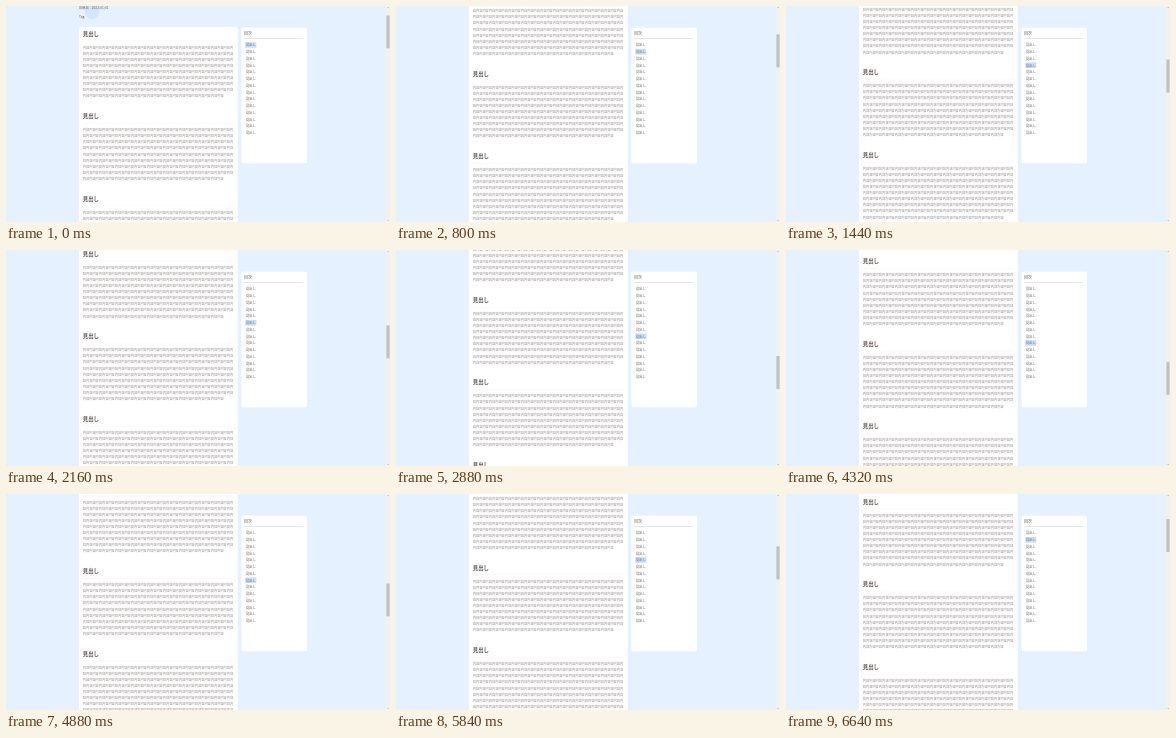
An HTML page that plays this animation: 384 px wide and 216 px high, repeating every 6.72 s.

```html
<!DOCTYPE html>
<html lang="ja">
<meta charset="utf-8">
<style>
html, body { margin: 0; width: 100%; height: 100%; overflow: hidden; background: #e6f1ff; }
/* The page is laid out at 1920 x 1080 and shown at one fifth. */
#stage {
  position: absolute; width: 1920px; height: 1080px; overflow: hidden;
  transform: scale(.2); transform-origin: 0 0;
  font: 16px/30.5px "Noto Sans CJK JP", "Noto Sans CJK", sans-serif; color: #5c5451;
}
#stage div, h2, p { position: absolute; margin: 0; }
#page { width: 1920px; }
#card, #toc { background: #fff; border-radius: 8px; }
#card { left: 365px; top: 105px; width: 794px; height: 6100px; }
#dot { left: 395px; top: -5px; width: 70px; height: 70px; border-radius: 50%; background: #d3e5ff; }
.meta { left: 365px; white-space: nowrap; }
h2 { left: 384px; width: 754px; height: 56px; font-size: 27px; line-height: 40px; border-bottom: 2px solid #f1f1f1; }
p { left: 384px; width: 756px; word-break: break-all; color: #989190; }
#toc { left: 1177px; top: 109px; width: 328px; height: 677px; }
#title { left: 13px; top: 10px; width: 295px; height: 43px; font-size: 20px; font-weight: 500; line-height: 40px; border-bottom: 3px solid #d8d8d8; }
.item { left: 19px; padding: 0 4px; line-height: 28px; font-weight: 500; white-space: nowrap; }
.item.on { background: #cfdff3; color: #56657c; }
#bar { left: 1901px; width: 19px; height: 1080px; background: #f1f1f1; }
#thumb { left: 1px; width: 16px; height: 165px; background: #c1c1c1; }
.arrow { left: 5px; border: 5px solid transparent; }
</style>
<div id="stage">
  <div id="page">
    <div id="card"></div>
    <div id="dot"></div>
    <div class="meta" style="top:-5px">投稿日：2022/01/01</div>
    <div class="meta" style="top:38px">Tag:</div>
  </div>
  <div id="toc"><div id="title">目次</div></div>
  <div id="bar">
    <div id="thumb"></div>
    <div class="arrow" style="top:0;border-bottom-color:#aaa"></div>
    <div class="arrow" style="bottom:0;border-top-color:#aaa"></div>
  </div>
</div>
<script>
const COUNT = 14, GAP = 82.5, FIRST = 28, LOOP = 6720, STEP = 80, HOLD = 400;
// [time in ms, scroll distance in stage pixels]
const path = [[320, 0], [1440, 291.5], [2160, 436.5], [3600, 839], [3680, 846],
              [4880, 528], [5840, 284], [6640, 102.5]];
const $ = id => document.getElementById(id);

function add(parent, tag, text, top, cls = '') {
  const el = document.createElement(tag);
  el.textContent = text;
  el.className = cls;
  el.style.top = top + 'px';
  return parent.appendChild(el);
}

const items = [];
for (let k = 0; k < COUNT; k++) {
  const y = 5 * (FIRST + GAP * k);
  add($('page'), 'h2', '見出し', y - 23);
  add($('page'), 'p', '内容'.repeat(210), y + 51);
  items.push(add($('toc'), 'div', '見出し', 72 + 33.75 * k, 'item'));
}

function scrollAt(t) {
  if (t < HOLD) return 0;
  const i = path.findIndex(p => p[0] >= t);
  const [t0, s0] = path[i - 1], [t1, s1] = path[i];
  return s0 + (s1 - s0) * (t - t0) / (t1 - t0);
}

// A heading becomes current on entering the top band and stays so until another enters.
function currentAt(time) {
  let current = 0;
  for (let t = 0; t <= time; t += STEP) {
    const s = scrollAt(t);
    for (let k = 0; k < COUNT; k++) {
      const y = FIRST + GAP * k - s;
      if (y > -3 && y < 43) current = k;
    }
  }
  return current;
}

function draw() {
  const t = Math.floor(performance.now() % LOOP / STEP) * STEP;
  const s = scrollAt(t), current = currentAt(t);
  $('page').style.transform = `translateY(${-5 * s}px)`;
  $('thumb').style.top = 47 + s * 0.757 + 'px';
  items.forEach((el, k) => el.classList.toggle('on', k === current));
  requestAnimationFrame(draw);
}
draw();
</script>
</html>
```
